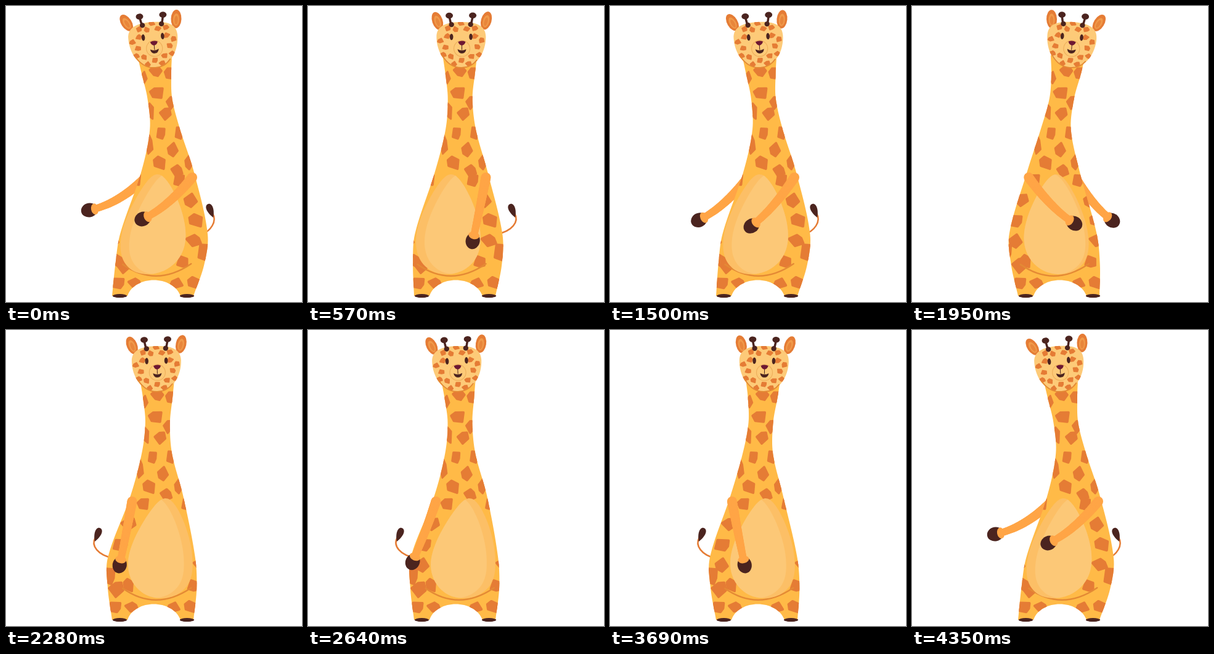
Animation of 480x480 px, one loop 4.44 s. Source, as an HTML page with a canvas:

```html
<!DOCTYPE html>
<html lang="en">
<head>
<meta charset="utf-8">
<title>Dancing giraffe</title>
<style>
html, body { margin: 0; width: 100%; height: 100%; overflow: hidden; background: #fff; }
canvas { display: block; width: 480px; height: 480px; }
</style>
</head>
<body>
<canvas id="stage" width="480" height="480"></canvas>
<script>
const c = document.getElementById('stage').getContext('2d');
const LOOP = 4440, TAU = Math.PI * 2, SIDES = [-1, 1];
const COL = { body: '#ffba47', spot: '#e57c35', arm: '#ffa546', dark: '#4b241f',
  belly: '#fcc877', shade: '#fcbf66', face: '#fdca78', line: '#e48a35' };

// Each dance pose: side the body leans to, then angle and length of both arms
const POSES = {
  A: [-1, -60, 106, -50, 105],
  B: [1, 50, 100, 35, 105],
  C: [1, 45, 105, 41, 92],
  D: [-1, -40, 105, -50, 100]
};
const STEPS = 'ABABACDCDCA';
const BEATS = [0, 360, 755, 1150, 1590, 1960, 2490, 2970, 3430, 3890, 4340];

// Body outline: half width at a few heights
const ROWS = [80, 110, 150, 200, 270, 370, 420, 470];
const HALF = [28, 24, 20, 24.5, 43, 71, 72, 66];

const mix = (a, b, k) => a + (b - a) * k;
const ease = k => (1 - Math.cos(Math.PI * Math.max(0, Math.min(1, k)))) / 2;

function spline(vals, y) {
  let i = 0;
  while (i < ROWS.length - 2 && y > ROWS[i + 1]) i++;
  const slope = j => {
    const a = Math.max(0, j - 1), b = Math.min(ROWS.length - 1, j + 1);
    return (vals[b] - vals[a]) / (ROWS[b] - ROWS[a]);
  };
  const d = ROWS[i + 1] - ROWS[i], k = (y - ROWS[i]) / d, k2 = k * k, k3 = k2 * k;
  return vals[i] * (2 * k3 - 3 * k2 + 1) + vals[i + 1] * (3 * k2 - 2 * k3) +
    d * (slope(i) * (k3 - 2 * k2 + k) + slope(i + 1) * (k3 - k2));
}

function fill(color, path) {
  c.beginPath();
  path();
  c.fillStyle = color;
  c.fill();
}
const oval = (color, x, y, rx, ry, rot = 0) => fill(color, () => c.ellipse(x, y, rx, ry, rot, 0, TAU));

function stroke(color, width, path) {
  c.beginPath();
  path();
  c.strokeStyle = color;
  c.lineWidth = width;
  c.lineCap = c.lineJoin = 'round';
  c.stroke();
}

function clipped(path, paint) {
  c.save();
  c.beginPath();
  path();
  c.clip();
  paint();
  c.restore();
}

// Five-cornered patch with soft corners
function spot(x, y, rx, ry, seed) {
  const path = () => {
    for (let i = 0; i < 5; i++) {
      const a = (i + 0.3 * Math.sin(seed * 7 + i * 5)) / 5 * TAU + seed;
      const r = 0.95 + 0.14 * Math.sin(seed * 3 + i * 2.4);
      c.lineTo(x + rx * r * Math.cos(a), y + ry * r * Math.sin(a));
    }
    c.closePath();
  };
  fill(COL.spot, path);
  stroke(COL.spot, Math.min(4, rx / 2), path);
}

function bodySpots(mid, half, bel) {
  // A zigzag down the neck, closer together towards the chest
  for (let i = 0; i < 7; i++) {
    const y = 104 + 164 * (1 - (1 - i / 6) ** 1.4);
    spot(mid(y) + 2.5 * i * (-1) ** i, y, 9 + 2 * Math.sin(i * 1.6), 10, i + 1);
  }
  // Patches cut off by the neck's edges
  for (let i = 0; i < 4; i++) {
    const yr = 109 + 48 * i, yl = 116 + 55 * i;
    spot(mid(yr) + half(yr) - 3, yr, 7, 11, i + 2);
    if (i < 3) spot(mid(yl) - half(yl) + 2, yl, 6, 9 + 4 * i, i + 5);
  }
  // Flanks follow the belly, legs stay put
  for (const d of SIDES) {
    for (let i = 0; i < 5; i++) {
      const y = 282 + 33 * i;
      spot(mid(y) + bel + d * 68 * Math.sin(0.54 + 0.43 * i), y, 9 + 4 * Math.sin(i * 0.8), 10, i + d + 3);
    }
    spot(mid(398) + bel + 84 * d, 398, 10, 15, 4);
    spot(mid(449) + 62 * d, 449, 11, 9, 5 + d);
    spot(mid(450) + 34 * d, 450, 10, 8, 8 + d);
  }
  spot(mid(421) - 58, 421, 12, 13, 3);
}

function arm(x, y, deg, len) {
  const a = deg * Math.PI / 180;
  const hx = x + len * Math.sin(a), hy = y + len * Math.cos(a);
  const cx = (x + hx) / 2, cy = (y + hy) / 2 + 20 * Math.abs(Math.sin(a));
  const dir = Math.atan2(hy - cy, hx - cx);
  oval(COL.dark, hx, hy, 13.5, 11.5, dir);
  for (let k = 0; k <= 0.9; k += 0.015) {
    const q = 1 - k;
    const px = q * q * x + 2 * q * k * cx + k * k * hx;
    const py = q * q * y + 2 * q * k * cy + k * k * hy;
    oval(COL.arm, px, py, 8 - 2.5 * k, 8 - 2.5 * k);
  }
  oval(COL.arm, hx - 9 * Math.cos(dir), hy - 9 * Math.sin(dir), 6, 9, dir);
}

function tail(x, turn) {
  const side = 1 - 2 * turn, tx = mix(331, 149, turn);
  stroke(COL.spot, 2.5, () => {
    c.moveTo(x + 62 * side, 370);
    c.bezierCurveTo(tx, 365, tx + 12 * side, 350, tx + 4 * side, 336);
  });
  fill(COL.dark, () => {
    c.moveTo(tx + 5 * side, 343);
    c.bezierCurveTo(tx - 3 * side, 337, tx - 10 * side, 327, tx - 5 * side, 322);
    c.bezierCurveTo(tx + 2 * side, 317, tx + 8 * side, 328, tx + 5 * side, 343);
  });
}

function headPath() {
  c.moveTo(-40, 50);
  c.bezierCurveTo(-40, 30, -21, 26, 0, 26);
  c.bezierCurveTo(21, 26, 40, 30, 40, 50);
  c.bezierCurveTo(40, 74, 26, 100, 0, 100);
  c.bezierCurveTo(-26, 100, -40, 74, -40, 50);
}

function ear(x, y, rot) {
  c.save();
  c.translate(x, y);
  c.rotate(rot);
  oval(COL.spot, 0, 0, 8.5, 15);
  oval('#f09a4a', 0, 1, 5, 10);
  oval('#e8863b', 0, 2, 2.8, 7);
  c.restore();
}

function head(x, s) {
  c.save();
  c.translate(x, 60);
  c.rotate(s * 0.08);
  c.translate(0, -60);
  ear(-38 + 3 * s, 24, -0.3 + 0.2 * s);
  ear(41 + s, 24, 0.3 + 0.18 * s);
  fill(COL.face, headPath);
  clipped(headPath, () => {
    for (let i = 0; i < 18; i++) {
      const a = (i + 0.5) / 18 * TAU, r = i % 2 ? 34 : 26;
      spot(r * Math.cos(a), 62 + r * Math.sin(a), 4.5, 3.8, i);
    }
  });
  stroke(COL.line, 1.8, () => {
    c.moveTo(-31, 80);
    c.bezierCurveTo(-22, 95, -12, 100, 0, 100);
    c.bezierCurveTo(10, 100, 19, 96, 25, 88);
  });
  for (const d of SIDES) {
    stroke(COL.dark, 3.5, () => { c.moveTo(16 * d, 31); c.lineTo(19 * d, 17); });
    oval(COL.dark, 19 * d, 15.5, 6, 4.8);
    oval(COL.dark, 15.5 * d, 30, 4.2, 4.2);
    oval(COL.dark, 15.7 * d, 50, 2.8, 5.2);
  }
  oval(COL.face, 1, 69, 13, 13);
  stroke('#eeb05c', 1.2, () => c.arc(1, 69, 13, 0, TAU));
  stroke(COL.dark, 1, () => { c.moveTo(1, 63); c.lineTo(1, 71); });
  fill('#6d1832', () => {
    c.moveTo(-5, 58);
    c.quadraticCurveTo(1, 55, 7, 58);
    c.quadraticCurveTo(6, 63, 1, 64);
    c.quadraticCurveTo(-4, 63, -5, 58);
  });
  fill(COL.dark, () => {
    c.moveTo(-6, 70);
    c.quadraticCurveTo(1, 74, 8, 70);
    c.quadraticCurveTo(7, 77, 1, 77);
    c.quadraticCurveTo(-5, 77, -6, 70);
  });
  c.restore();
}

function draw(t) {
  let i = 0;
  while (i < BEATS.length - 2 && t >= BEATS[i + 1]) i++;
  const k = ease((t - BEATS[i]) / (BEATS[i + 1] - BEATS[i]));
  const from = POSES[STEPS[i]], to = POSES[STEPS[i + 1]];
  const [s, aL, lenL, aR, lenR] = from.map((v, j) => mix(v, to[j], k));
  // 0 = turned to the left, 1 = turned to the right
  const turn = t < 3000 ? ease((t - 1600) / 560) : 1 - ease((t - 3850) / 490);

  const h = mix(2 - 15 * s, -4.5 - 12.5 * s, turn), top = 245 + h;
  const hip = mix(243 - 13 * s, 234 - 6 * s, turn);
  const bel = mix(-16.5, 14.5, turn);
  const mids = [247 + 6 * s, 247 + 3 * s, 246 + 0.2 * h, 245 + 0.75 * h,
    top, hip, mix(239, hip, 0.6), 238];
  const mid = y => spline(mids, y), half = y => spline(HALF, y);

  function bodyPath() {
    for (let y = 80; y <= 470; y += 5) c.lineTo(mid(y) - half(y), y);
    c.lineTo(197, 470);
    c.bezierCurveTo(209, 436, 270, 436, 283, 470);
    for (let y = 470; y >= 80; y -= 5) c.lineTo(mid(y) + half(y), y);
    c.closePath();
  }
  function bellyPath(dx) {
    for (let a = 0; a < TAU; a += 0.06) {
      const y = 354 - 81 * Math.cos(a);
      c.lineTo(mid(y) + bel + dx + 49 * Math.sin(a) * (1 - 0.4 * Math.cos(a)), y);
    }
    c.closePath();
  }
  const leftFront = turn > 0.35, rightFront = turn < 0.65;
  const left = () => arm(top - (leftFront ? 40 : 35), 278, aL, lenL);
  const right = () => arm(top + (rightFront ? 40 : 35), 278, aR, lenR);

  c.fillStyle = '#fff';
  c.fillRect(0, 0, 480, 480);
  tail(hip, turn);
  if (!leftFront) left();
  if (!rightFront) right();

  const feet = () => SIDES.forEach(d => oval(COL.dark, 239 + 54.5 * d, 470, 11.5, 3));
  feet();
  fill(COL.body, bodyPath);
  clipped(bodyPath, () => {
    bodySpots(mid, half, bel);
    const fold = hip + bel * 0.65;
    stroke(COL.line, 2.5, () => {
      c.moveTo(fold - 56, 419);
      c.quadraticCurveTo(fold - 2, 457, fold + 55, 418);
    });
  });
  feet();

  fill(COL.shade, () => bellyPath(0));
  clipped(() => bellyPath(0), () => fill(COL.belly, () => bellyPath(14 * (1 - 2 * turn))));

  head(249.5 + 10.5 * s - 2 * turn, s);
  if (leftFront) left();
  if (rightFront) right();
}

function tick() {
  const t = performance.now() % LOOP;
  draw(Math.min(4350, Math.floor(t / 30) * 30));
  requestAnimationFrame(tick);
}
tick();
</script>
</body>
</html>
```
